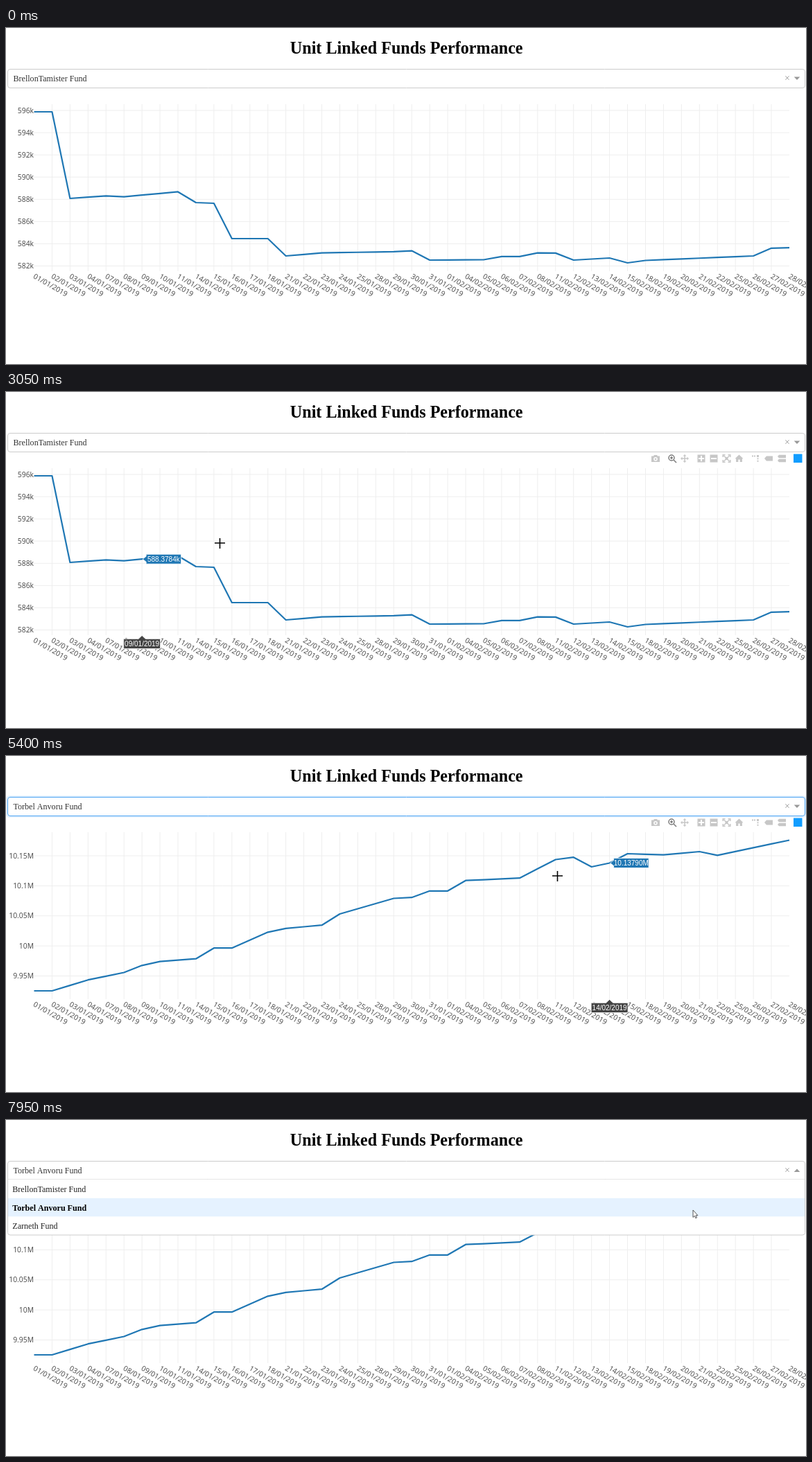
Recreate the animation shown at these times as an HTML page with a canvas. Size 1154 by 485 pixels, loop 8000 ms.

```html
<!DOCTYPE html>
<html lang="en">
<head>
<meta charset="utf-8">
<title>Unit Linked Funds Performance</title>
<style>
html, body { margin: 0; width: 100%; height: 100%; overflow: hidden; background: #fff; }
canvas { display: block; }
</style>
</head>
<body>
<canvas id="stage" width="1154" height="485"></canvas>
<script>
const ctx = document.getElementById('stage').getContext('2d');
const LOOP = 8000, DAYS = 43, LEFT = 40.5, RIGHT = 1130, TOP = 110, BOTTOM = 351;
const STEP = (RIGHT - LEFT) / (DAYS - 1);
const SERIF = '"Liberation Serif", "Times New Roman", serif';
const SANS = '10px "Liberation Sans", Arial, sans-serif';
const PLOT = '10.34px "Open Sans", Verdana, sans-serif';
const FUNDS = ['BrellonTamister Fund', 'Torbel Anvoru Fund', 'Zarneth Fund'];

const pointX = i => LEFT + i * STEP;
const clamp = (v, lo, hi) => Math.min(hi, Math.max(lo, v));

// Turning points (day, height in pixels); the days between lie on straight lines.
function polyline(turns) {
  return Array.from({ length: DAYS }, (_, day) => {
    const i = Math.max(1, turns.findIndex(p => p[0] >= day));
    const [d0, y0] = turns[i - 1], [d1, y1] = turns[i];
    return y0 + (y1 - y0) * (day - d0) / (d1 - d0);
  });
}
const SERIES = [
  { unit: 'k', base: 582, y0: 343.5, perUnit: 16.036, tick: 2, count: 8,
    y: polyline([[0, 121], [1, 121], [2, 246], [4, 242.3], [5, 243.6], [8, 236.448], [9, 252],
      [10, 253], [11, 304], [13, 304], [14, 329], [16, 324.6], [20, 322.857], [21, 321.6], [22, 335],
      [25, 334.5], [26, 329.8], [27, 329.8], [28, 324.6], [29, 324.9], [30, 335], [32, 332], [33, 339],
      [34, 335.5], [40, 329], [41, 317.8], [42, 317.2]]) },
  { unit: 'M', base: 9.95, y0: 317.5, perUnit: 867.5, tick: .05, count: 5,
    y: polyline([[0, 339], [1, 339], [3, 323.2], [5, 312.5], [6, 302.3], [7, 296.7], [9, 292.7],
      [10, 277.2], [11, 277.2], [13, 254.3], [14, 248.8], [16, 244.2], [17, 228], [20, 205.5],
      [21, 204.2], [22, 194.8], [23, 194.8], [24, 179.7], [27, 176.2], [29, 149.5], [30, 146.2],
      [31, 160], [32, 154.5], [33, 141], [35, 142.595], [37, 138], [38, 143.3], [42, 121.5]]) }
];

// Business days from 1 January 2019.
const DATES = [];
for (let d = new Date(2019, 0, 1); DATES.length < DAYS; d.setDate(d.getDate() + 1)) {
  if (d.getDay() % 6) {
    DATES.push([d.getDate(), d.getMonth() + 1].map(n => String(n).padStart(2, '0')).join('/') + '/2019');
  }
}

// Mouse moves: start, end, x, y; the mouse rests in between.
const ARROW = [1139, 76], OPTION = [1032, 127];
const MOVES = [
  [310, 310, 394, 435], [310, 1090, 815, 324], [1110, 1165, 552, 325], [1320, 1410, 418, 325],
  [1730, 1960, 852, 300], [1960, 2480, 142, 204], [2560, 2730, 155, 222], [2890, 3050, 308, 218],
  [3130, 3660, ...ARROW], [4370, 4680, ...OPTION], [5010, 5710, 628, 205], [5770, 5980, 1000, 74],
  [5980, 6320, 938, 141], [6400, 6860, 585, 210], [6860, 7320, ...ARROW], [7640, 7950, 991, 130]
];
const OPEN = [4070, 7590], CHOSEN = 5010, REDRAWN = 5090;
const CLICKS = [[3910, 4130], [4930, CHOSEN], [7550, 7680]];

function mouse(t) {
  let pos = null;
  for (const [start, end, x, y] of MOVES) {
    if (t < start) break;
    const f = end > start ? clamp((t - start) / (end - start), 0, 1) : 1;
    const ease = f * f * (3 - 2 * f);
    pos = pos ? [pos[0] + (x - pos[0]) * ease, pos[1] + (y - pos[1]) * ease] : [x, y];
  }
  return pos;
}
const isOpen = t => (t >= OPEN[0] && t < CHOSEN) || t >= OPEN[1];
function inGraph(t) {
  const m = mouse(t);
  return !!m && m[1] > 87 && !isOpen(t);
}
function inPlot(t) {
  const m = mouse(t);
  return inGraph(t) && m[0] >= LEFT && m[0] <= RIGHT && m[1] >= TOP && m[1] <= BOTTOM;
}

function text(str, x, y, font, color, align = 'left') {
  ctx.font = font;
  ctx.fillStyle = color;
  ctx.textAlign = align;
  ctx.fillText(str, x, y);
}
function shape(path, fill, stroke, width = 1) {
  const p = new Path2D(path);
  if (fill) { ctx.fillStyle = fill; ctx.fill(p, 'evenodd'); }
  if (stroke) { ctx.strokeStyle = stroke; ctx.lineWidth = width; ctx.stroke(p); }
}
function at(x, y, draw) {
  ctx.save();
  ctx.translate(x, y);
  draw();
  ctx.restore();
}
function box(x, y, w, h, r, stroke, width, fill) {
  const p = new Path2D();
  p.roundRect(x, y, w, h, r);
  shape(p, fill, stroke, width);
}

function drawChart(s) {
  for (let i = 1; i < DAYS - 1; i++) shape(`M${pointX(i)} ${TOP}V${BOTTOM}`, null, '#eee');
  for (let i = 0; i < s.count; i++) {
    const y = s.y0 - i * s.tick * s.perUnit;
    shape(`M${LEFT} ${y}H${RIGHT}`, null, '#eee');
    text(+(s.base + i * s.tick).toFixed(2) + s.unit, 40, y + 3.7, PLOT, '#444', 'right');
  }
  DATES.forEach((date, i) => at(pointX(i) - 1.9, 360.5, () => {
    ctx.rotate(Math.PI / 6);
    text(date, 0, 0, PLOT, '#444');
  }));
  ctx.lineJoin = 'round';
  shape('M' + s.y.map((y, i) => pointX(i) + ' ' + y).join('L'), null, '#1f77b4', 2.2);
  ctx.lineJoin = 'miter';
}

function drawHover(s, x) {
  const i = Math.round((clamp(x, LEFT, RIGHT) - LEFT) / STEP), y = s.y[i];
  const value = (s.base + (s.y0 - y) / s.perUnit).toPrecision(7) + s.unit;
  at(pointX(i), y, () => {
    shape('M1 0L6-4V-7H56.5V7H6V4z', '#1f77b4', '#fff', .8);
    text(value, 31.2, 3.6, SANS, '#fff', 'center');
  });
  at(pointX(i), BOTTOM, () => {
    shape('M0 .5L5 5.3H26.5V19.5H-26.5V5.3H-5z', '#444', '#fff', .8);
    text(DATES[i], 0, 16, SANS, '#fff', 'center');
  });
}

// Toolbar icons: x, filled path, stroked path.
const PLATE = 'M-5.5-5.5h11v11h-11z';
const ICONS = [
  [937, 'M-6-3.5h3l1-1.5h4l1 1.5h3V5H-6zM0-2a2.8 2.8 0 100 5.6A2.8 2.8 0 000-2zM0-.6a1.4 1.4 0 110 2.8 1.4 1.4 0 010-2.8z'],
  [961, '', 'M-1-5a4 4 0 100 8 4 4 0 000-8zM2 2l4 4M-3-1h4M-1-3v4'],
  [979, 'M-6 0l2.5-2.5v5zM6 0L3.5-2.5v5zM0-6l2.5 2.5h-5zM0 6l2.5-2.5h-5z', 'M-4 0H4M0-4V4'],
  [1003, PLATE + 'M-1-4h2v3h3v2h-3v3h-2v-3h-3v-2h3z'],
  [1021, PLATE + 'M-4-1h8v2h-8z'],
  [1039.5, 'M-2-2h4v4h-4z', 'M-5.3-2v-3.3h3.3M2-5.3h3.3v3.3M5.3 2v3.3H2M-2 5.3h-3.3V2M-4-4L4 4M4-4L-4 4'],
  [1057.5, 'M0-5.5L6 .3H4.4V5H1.2V1.6H-1.2V5H-4.4V.3H-6z'],
  [1081, 'M-5-4.5h2v2h-2zM-2-4.5h2v2h-2zM2-5h3v3h-3zM2.5-.8h2v2h-2zM2.5 2.7h2v2h-2z'],
  [1100, 'M-6 0l3-3.5h9v7h-9z'],
  [1119, 'M-6-3l2-2.2h10v4.4h-10zM-6 3l2-2.2h10v4.4h-10z']
];
function drawToolbar(opacity) {
  ctx.globalAlpha = opacity;
  ICONS.forEach(([x, fill, line], i) => at(x, 96, () => {
    const color = i === 1 ? '#7c7c7c' : '#c7c7c7';
    shape(fill, color);
    if (line) shape(line, null, color, 1.5);
  }));
  ctx.fillStyle = '#119dff';
  ctx.fillRect(1136, 89.5, 12.5, 12.5);
  ctx.globalAlpha = 1;
}

function drawSelect(t, selected, m) {
  const open = isOpen(t), focused = selected === 1 && !open, rowHeight = 26.5;
  if (focused) box(1.3, 58.2, 1152, 29.6, 4, 'rgba(0,126,255,.1)', 2.6);
  box(2.5, 59.5, 1150, 27, open ? [3.5, 3.5, 0, 0] : 3.5, focused ? '#4ba3f2' : '#ccc', 1, '#fff');
  text(FUNDS[selected], 10.5, 77, '12.07px ' + SERIF, '#333');
  text('×', 1127, 76.5, '14px ' + SERIF, '#999', 'center');
  at(1141, 72.8, () => {
    if (open) ctx.scale(1, -1);
    shape('M-4.3-2.2h8.6L0 2.2z', '#999');
  });
  if (!open) return;
  box(2.5, 85.5, 1150, 80.5, [0, 0, 3.5, 3.5], '#ccc', 1, '#fff');
  shape('M3 85.5H1152', null, '#e6e6e6');
  const row = m[1] < 88 ? selected : m[1] < 113 ? 0 : 1;
  ctx.fillStyle = '#e5f2ff';
  ctx.fillRect(3, 86.3 + row * rowHeight, 1149, rowHeight);
  FUNDS.forEach((name, i) => {
    const bold = i === selected;
    text(name, 9.3, 104 + i * rowHeight, (bold ? 'bold ' : '') + '12.07px ' + SERIF, bold ? '#000' : '#222');
  });
}

function drawCursor(t, [x, y]) {
  if (CLICKS.some(([a, b]) => t >= a && t < b)) {
    ctx.fillStyle = 'rgba(255,255,0,.55)';
    ctx.beginPath();
    ctx.arc(x - .5, y, 9.2, 0, 7);
    ctx.fill();
  }
  at(Math.round(x), Math.round(y), () => {
    if (inPlot(t)) {
      // Inverts whatever lies beneath, as a system crosshair does.
      ctx.globalCompositeOperation = 'difference';
      shape('M-7-.8H8V.8H-7zM-.3-7H1.3V8H-.3zM-.3-.8H1.3V.8H-.3z', '#fff');
    } else if (y < 88 && x > 1120) {
      shape('M-1 1.2q1.2-1.2 2.2 0V6l1.8.3 1.7.6 1.5 1V11L5 14H0L-3.5 9.5q0-1.8 1.5-1L-1 9.5z', '#fff', '#444');
      shape('M1.2 6v2.5M3.2 6.5v2.3', null, '#444', .8);
    } else {
      shape('M0 0V10.5L2.3 8.3 3.9 11.8 5.5 11 4 7.8H7z', '#fff', '#444', .9);
    }
  });
}

function frame(now) {
  const t = now % LOOP, m = mouse(t), selected = t >= CHOSEN ? 1 : 0;
  const series = SERIES[t >= REDRAWN ? 1 : 0];
  ctx.fillStyle = '#fff';
  ctx.fillRect(0, 0, 1154, 485);
  text('Unit Linked Funds Performance', 577.7, 37, 'bold 24.13px ' + SERIF, '#000', 'center');
  drawChart(series);

  // The toolbar fades over 300 ms; the label trails the mouse a little.
  let shown = 0;
  for (let ago = 0; ago < 300; ago += 10) shown += inGraph(t - ago) / 30;
  if (shown > 0) drawToolbar(Math.min(1, shown));
  if (inPlot(t)) drawHover(series, (mouse(t - 100) || m)[0]);

  drawSelect(t, selected, m);
  if (m) drawCursor(t, m);
  requestAnimationFrame(frame);
}
requestAnimationFrame(frame);
</script>
</body>
</html>
```
